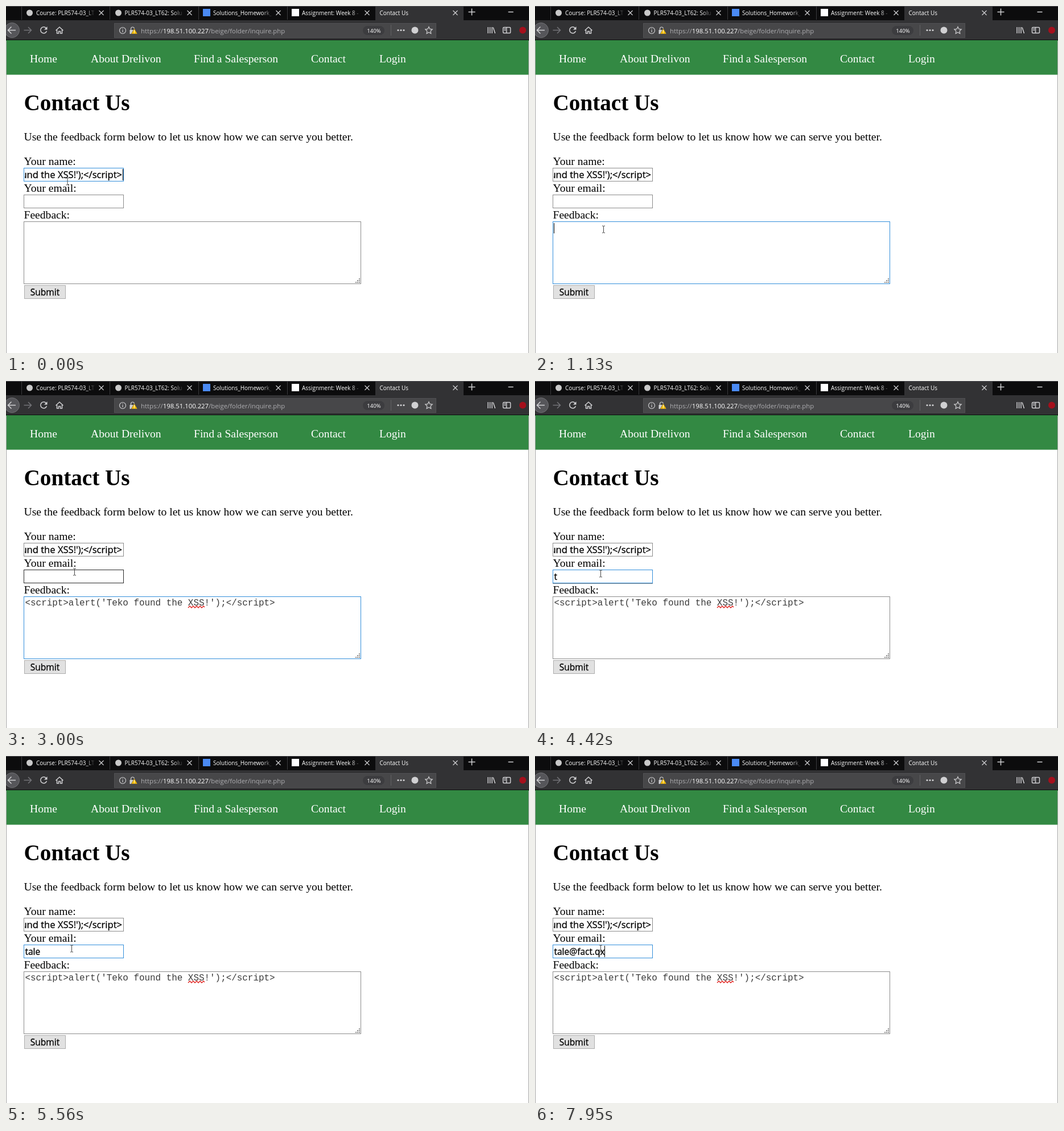
An HTML page that plays this animation: 919x609 px, repeating every 8000 ms.

```html
<!DOCTYPE html>
<html lang="en">
<head>
<meta charset="utf-8">
<title>Contact Us</title>
<style>
  html, body { margin: 0; width: 100%; height: 100%; overflow: hidden; background: #fff; }
  svg { display: block; }
  text { white-space: pre; }
  .ui { font-family: "Open Sans", "Noto Sans", sans-serif; }
  .tab { font-size: 10px; fill: #fff; }
  .page { font: 19.6px "Liberation Serif", serif; fill: #000; }
  .nav { fill: #fff; }
  .head { font-size: 39.2px; font-weight: bold; }
  .mono { font: 15.925px "Liberation Mono", monospace; fill: #3a3a3a; }
  .field { font-size: 15.5px; fill: #000; stroke: #000; stroke-width: .3; }
  .icon { fill: none; stroke: #d0d0d2; stroke-width: 1.5; }
  .thin { stroke-width: 1.2; }
  .box { fill: #fff; stroke: #8c8c8c; }
  .box.hover { stroke: #2b2b2b; }
  .box.focus { stroke: #338fdb; }
</style>
</head>
<body>
<svg width="919" height="609" viewBox="0 0 919 609">
  <defs>
    <linearGradient id="fade">
      <stop offset="0" stop-color="#0c0c0d" stop-opacity="0"/>
      <stop offset=".65" stop-color="#0c0c0d"/>
    </linearGradient>
    <path id="close" class="icon thin" d="M-4 -4L4 4M4 -4L-4 4"/>
  </defs>

  <!-- Tab strip -->
  <rect width="919" height="61" fill="#0c0c0d"/>
  <rect x="649" y="1" width="155" height="24" fill="#323234"/>
  <rect y="25" width="919" height="34" fill="#323234"/>
  <g class="ui tab">
    <text x="53" y="15.5">Course: PLR574-03_LT</text>
    <text x="208.5" y="15.5">PLR574-03_LT62: Solu</text>
    <text x="364" y="15.5">Solutions_Homework_</text>
    <text x="520" y="15.5">Assignment: Week 8 -</text>
    <text x="656.5" y="15.5">Contact Us</text>
  </g>
  <g id="tabs"></g>
  <circle cx="41.5" cy="12" r="5.5" fill="#c9c9c9"/>
  <circle cx="197.5" cy="12" r="5.5" fill="#c9c9c9"/>
  <rect x="346" y="5" width="13" height="13" fill="#4a8af4"/>
  <rect x="502" y="5" width="13" height="13" fill="#fff"/>
  <path class="icon" d="M812.5 10.5h12M818.5 4.5v12M882.5 10.5h9"/>

  <!-- Toolbar -->
  <circle cx="10.5" cy="42.5" r="13" fill="#56565a" stroke="#737377"/>
  <path class="icon" d="M4 42.5h13M9.5 36.5l-6 6l6 6"/>
  <path class="icon" d="M31.5 42.5h13M39 37l5.5 5.5l-5.5 5.5" style="stroke:#737377"/>
  <path class="icon" d="M71 39.5A5.5 5.5 0 1 0 71.5 44"/>
  <path d="M72.5 36v5.5h-5.5z" fill="#d0d0d2"/>
  <path class="icon" d="M87.5 43l6.5 -6l6.5 6M89.5 42v6h3v-3.5h3v3.5h3v-6"/>
  <rect x="190.5" y="30.5" width="565" height="25" fill="#474749" stroke="#515154"/>
  <circle class="icon thin" cx="205" cy="43" r="5.5"/>
  <path class="icon thin" d="M205 42v4M205 39.5v1.3M219.5 42v-2a3 3 0 0 1 6 0v2"/>
  <rect x="217.5" y="42" width="9" height="7" fill="#d0d0d2"/>
  <path d="M225.5 39.5l5.5 9.5h-11z" fill="#ffbf00" stroke="#474749" stroke-width=".6"/>
  <path d="M225.5 42.5v3M225.5 46.5v1.3" stroke="#fff" stroke-width="1.2"/>
  <text class="ui" x="237" y="47.5" font-size="11.35" fill="#adadb0">https://<tspan fill="#fff">198.51.100.227</tspan>/beige/folder/inquire.php</text>
  <rect x="627" y="35" width="38" height="16" rx="8" fill="#3c3c3f"/>
  <text class="ui" x="646.5" y="46.5" font-size="9.7" text-anchor="middle" fill="#fff">140%</text>
  <path d="M676.5 33v19" stroke="#606063"/>
  <g fill="#d0d0d2">
    <circle cx="689" cy="42.5" r="1.6"/>
    <circle cx="694" cy="42.5" r="1.6"/>
    <circle cx="699" cy="42.5" r="1.6"/>
    <circle cx="718.5" cy="42.5" r="6"/>
  </g>
  <path id="star" class="icon thin"/>
  <path class="icon" d="M847 37v11M850.5 37v11M854 37v11M856 37.5l3.5 10.5"/>
  <rect class="icon" x="873.5" y="37.5" width="13" height="10" rx="1.5"/>
  <path class="icon" d="M879.5 37.5v10M875.5 40h2.5M875.5 42.5h2.5"/>
  <circle cx="908" cy="42.5" r="6" fill="#a5101c"/>

  <!-- Page -->
  <rect y="60" width="919" height="60.6" fill="#338943"/>
  <g class="page">
    <g class="nav">
      <text x="42" y="98.5">Home</text>
      <text x="149" y="98.5">About Drelivon</text>
      <text x="330" y="98.5">Find a Salesperson</text>
      <text x="536" y="98.5">Contact</text>
      <text x="656" y="98.5">Login</text>
    </g>
    <text class="head" x="31.5" y="183">Contact Us</text>
    <text x="31.5" y="236">Use the feedback form below to let us know how we can serve you better.</text>
    <text x="31.5" y="279">Your name:</text>
    <text x="31.5" y="326">Your email:</text>
    <text x="31.5" y="373">Feedback:</text>
  </g>
  <rect id="nameBox" class="box" x="31.5" y="284.5" width="175" height="23"/>
  <rect id="mailBox" class="box" x="31.5" y="331.5" width="175" height="23"/>
  <rect id="noteBox" class="box" x="31.5" y="378.5" width="592" height="109"/>
  <path id="popup" d="M31 355.5h176" stroke="#8c8c8c"/>
  <path id="grip" fill="#8c8c8c"/>
  <rect x="32.5" y="490.5" width="72" height="23" fill="#e1e1e1" stroke="#adadad"/>
  <text class="ui field" x="68.5" y="508" text-anchor="middle">Submit</text>

  <svg x="33" y="285" width="172" height="22">
    <text class="ui field" x="171" y="17" text-anchor="end" style="font-size:16.6px">&lt;script&gt;alert('Teko found the XSS!');&lt;/script&gt;</text>
  </svg>
  <text id="mail" class="ui field" x="33.5" y="349"></text>
  <g id="note">
    <text class="mono" x="33.5" y="394">&lt;script&gt;alert('Teko found the XSS!');&lt;/script&gt;</text>
    <path d="M320 398l3 -3l3 3l3 -3l3 3l3 -3l3 3l3 -3l3 3l3 -3l2 2" fill="none" stroke="#e0201c" stroke-width="1.4"/>
  </g>
  <rect id="caret" width="1"/>

  <path id="beam" d="M-2.5 -6h2l.5 .5l.5 -.5h2M0 -5.5v11M-2.5 6h2l.5 -.5l.5 .5h2" fill="none" stroke="#444"/>
  <path id="arrow" d="M.5 .5v11l2.6 -2.4l1.8 4l1.9 -.8l-1.8 -4h3.5z" fill="#fff" stroke="#222"/>

  <path d="M.5 61v548M918.5 61v548" stroke="#a6a6a6"/>
  <path d="M0 .5h919" stroke="#55555a"/>
</svg>
<script>
const $ = id => document.getElementById(id);
const LOOP = 8000;
const ADDRESS = "tale@fact.qx";

// Static details
$("tabs").innerHTML = [27, 182, 338, 494, 649].map((x, i) =>
  (i < 4 ? `<rect x="${x + 112}" y="3" width="28" height="19" fill="url(#fade)"/>
   <path d="M${x + .5} 1v23" stroke="#3a3a3c"/>` : "") +
  `<use href="#close" x="${x + 140.5}" y="12"/>`).join("");

$("star").setAttribute("d", "M" + Array.from({ length: 10 }, (_, i) => {
  const a = i * Math.PI / 5, r = i % 2 ? 3.2 : 6.5;
  return `${743 + r * Math.sin(a)} ${43 - r * Math.cos(a)}`;
}).join("L") + "Z");

let dots = "";
for (let row = 0; row < 3; row++)
  for (let col = 2 - row; col < 3; col++)
    dots += `M${614 + col * 3} ${478 + row * 3}h2v2h-2z`;
$("grip").setAttribute("d", dots);

// Tracks of [time, ...values], each held until the next entry
const pointer = [
  [0, "beam", 108, 308], [500, "beam", 112, 342], [620, "arrow", 118, 366],
  [770, "arrow", 118, 381], [890, "beam", 120.5, 388], [1010, "beam", 120.5, 392],
  [2030, "beam", 120.5, 389], [2150, "beam", 120.5, 384], [2270, "arrow", 120, 370],
  [2390, "arrow", 120, 361], [2510, "beam", 120.5, 348], [2630, "beam", 120.5, 340],
  [2750, "beam", 120.5, 333.5], [3000, "beam", 120.5, 335], [3150, "beam", 117.5, 336],
  [3270, "beam", 115.5, 338]
];
const focus = [[0, "name"], [1010, "note"], [3270, "mail"]];
const typed = [
  [0, 0], [4420, 1], [4540, 2], [4660, 3], [5030, 4], [5680, 5], [6700, 6],
  [6820, 7], [7070, 8], [7190, 9], [7710, 10], [7830, 11], [7950, 12]
];
const blink = [
  [0, 1], [500, 0], [1130, 1], [1630, 0], [2030, 1], [2510, 0], [3390, 1],
  [3890, 0], [4780, 1], [5560, 0], [5680, 1], [6050, 0], [6580, 1],
  [7590, 0], [7950, 1]
];
const popup = [[0, 0], [4420, 1], [4780, 0]];
const PASTE = 1630;

const at = (track, t) => track.findLast(step => step[0] <= t).slice(1);
const show = (el, on) => el.setAttribute("visibility", on ? "visible" : "hidden");
const inside = (box, x, y) => {
  const get = k => +box.getAttribute(k);
  return x > get("x") && x < get("x") + get("width") &&
         y > get("y") && y < get("y") + get("height");
};

function draw(t) {
  const [shape, x, y] = at(pointer, t);
  const [field] = at(focus, t);
  for (const id of ["beam", "arrow"]) {
    show($(id), id === shape);
    $(id).setAttribute("transform", `translate(${x} ${y})`);
  }
  for (const id of ["name", "mail", "note"]) {
    const box = $(id + "Box");
    const over = shape === "beam" && inside(box, x, y);
    box.setAttribute("class", "box" + (id === field ? " focus" : over ? " hover" : ""));
  }

  const [count] = at(typed, t);
  const mail = $("mail");
  mail.textContent = ADDRESS.slice(0, count);
  show($("note"), t >= PASTE);
  show($("popup"), at(popup, t)[0]);

  const [cx, cy, ch] = {
    name: [205, 286, 20],
    mail: [Math.round(33 + (count ? mail.getComputedTextLength() : 0)), 333, 20],
    note: [t < PASTE ? 33 : 473, 381, 18]
  }[field];
  const caret = $("caret");
  caret.setAttribute("x", cx);
  caret.setAttribute("y", cy);
  caret.setAttribute("height", ch);
  show(caret, at(blink, t)[0]);
}

function tick() {
  draw(performance.now() % LOOP);
  requestAnimationFrame(tick);
}
tick();
</script>
</body>
</html>
```
